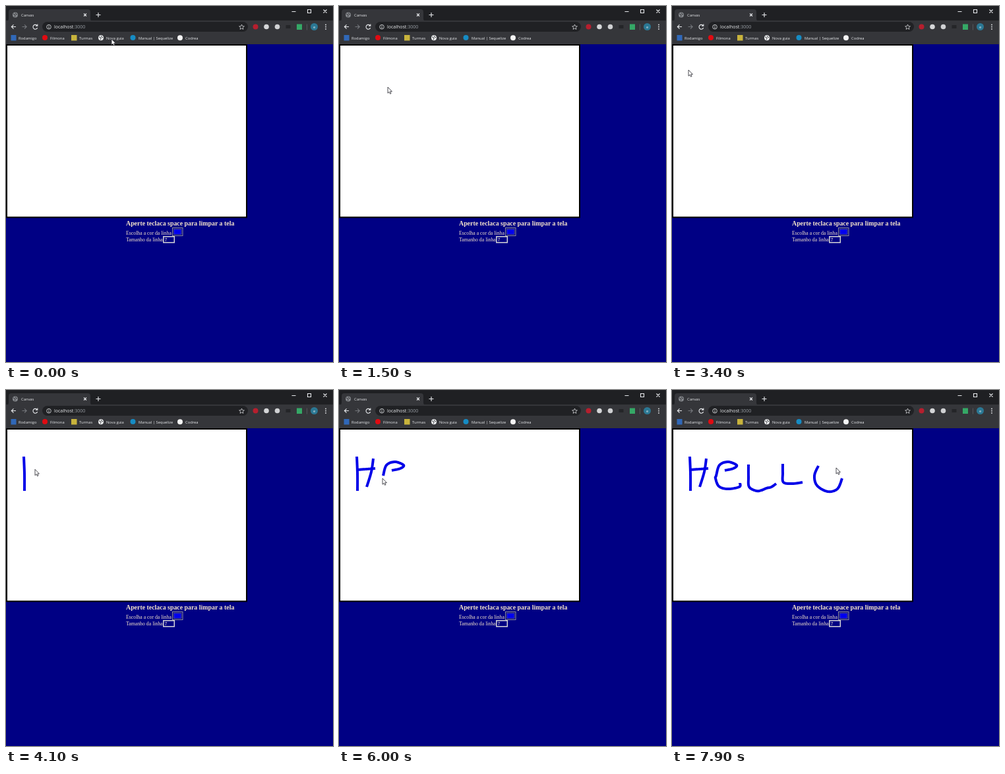
These frames come from a looping animation (496x540 px, 8 s). An HTML page:

```html
<!DOCTYPE html>
<html lang="pt">
<head>
<meta charset="utf-8">
<title>Canvas</title>
<style>
  html, body { margin: 0; width: 100%; height: 100%; overflow: hidden; background: #000084; }
  svg { display: block; }
  .ui { font: 5.8px "Open Sans", "Noto Sans", sans-serif; fill: #e8eaed; }
  .page { font: 7.8px "Liberation Serif", "Times New Roman", serif; fill: #f5e4cb; }
  .line { fill: none; stroke: #e8eaed; stroke-width: 1.1; }
</style>
</head>
<body>
<svg width="496" height="540" viewBox="0 0 496 540">
  <defs>
    <g id="globe">
      <circle r="4"/>
      <path d="M-3 -1.5L-.5 -.5L0 1.5L-1 3M.5 -3L1 -1.2L3 -.5" fill="none" stroke="#35363a"/>
    </g>
  </defs>

  <!-- Browser frame -->
  <rect width="496" height="23" fill="#1f2023"/>
  <path d="M2 23Q4 22 4 19V9Q4 5 8 5H124Q128 5 128 9V19Q128 22 131 23Z" fill="#35363a"/>
  <rect y="22" width="496" height="36" fill="#35363a"/>
  <rect x="55" y="24" width="312" height="15" rx="7.5" fill="#202124"/>
  <use href="#globe" x="14" y="13.5" fill="#85888c"/>
  <g class="line">
    <path d="M118 11.5l4 4m0-4l-4 4M140 10v7m-3.500-3.500h7"/>
    <path d="M433.500 8.500h6M457.500 5.500h5v5h-5zM481.500 5.500l5 5m0-5l-5 5"/>
    <path d="M15 31.500H8.500m3-3.200l-3.200 3.200l3.200 3.200"/>
    <path d="M24.500 31.500H31m-3-3.200l3.200 3.200l-3.200 3.200" stroke="#74777b"/>
    <path d="M47 29.600A3.400 3.400 0 1 0 47.600 33M47.800 27.500v2.800h-2.800"/>
    <path d="M65 31.300v2.500M65 29.500v1" stroke-width=".9"/>
    <circle cx="65" cy="31.700" r="3.300" stroke-width=".8"/>
    <path d="M357.500 28l1.100 2.600l2.800 .2l-2.100 1.900l.6 2.700l-2.400-1.500l-2.400 1.500l.6-2.700l-2.100-1.900l2.800-.2z" stroke-width=".7"/>
    <path d="M456.500 27.500v9" stroke="#606367" stroke-width=".7"/>
  </g>
  <circle cx="378.500" cy="31.500" r="4" fill="#b61f2e"/>
  <circle cx="395" cy="31.500" r="3.800" fill="#d5d6d8"/>
  <circle cx="411.500" cy="31.500" r="3.800" fill="#d0d1d3"/>
  <rect x="424.500" y="29" width="7" height="5" fill="#242528"/>
  <rect x="441" y="27.500" width="8" height="8.500" fill="#35a866"/>
  <circle cx="467.500" cy="31.500" r="5.500" fill="#2b7894"/>
  <text class="ui" x="465.900" y="33.500">e</text>
  <g fill="#e8eaed">
    <circle cx="485" cy="28.500" r=".9"/><circle cx="485" cy="31.700" r=".9"/><circle cx="485" cy="34.900" r=".9"/>
  </g>

  <!-- Bookmarks -->
  <rect x="7.500" y="44" width="8" height="8.500" fill="#3068b8"/>
  <circle cx="59" cy="48" r="4" fill="#e00b12"/>
  <rect x="99" y="44" width="8.500" height="8.500" fill="#c8b33c"/>
  <use href="#globe" x="144" y="48.300" fill="#f1f3f4"/>
  <circle cx="192.500" cy="48" r="4" fill="#168cc4"/>
  <circle cx="264" cy="48.300" r="4" fill="#f5f5f5"/>
  <g class="ui">
    <text x="23" y="15.800">Canvas</text>
    <text x="73" y="34" font-size="7" style="font-size:7px">localhost<tspan fill="#9aa0a6">:3000</tspan></text>
    <text x="19" y="50.500">Rodamigo</text>
    <text x="67" y="50.500">Filmona</text>
    <text x="111" y="50.500">Turmas</text>
    <text x="152" y="50.500">Nova guia</text>
    <text x="201" y="50.500">Manual | Sequelize</text>
    <text x="272" y="50.500">Codrea</text>
  </g>

  <!-- Page -->
  <rect y="58" width="496" height="482" fill="#000084"/>
  <rect x="1" y="59" width="364" height="261.500" fill="#fff" stroke="#000" stroke-width="2"/>
  <g class="page">
    <text x="182" y="333" style="font-size:9.9px;font-weight:bold">Aperte teclaca space para limpar a tela</text>
    <text x="182" y="346.500">Escolha a cor da linha</text>
    <text x="182" y="357">Tamanho da linha</text>
    <rect x="252.500" y="336.500" width="15.500" height="12" fill="#000084" stroke="#8c8c98"/>
    <rect x="254.500" y="338.500" width="11.500" height="8" fill="#0000ee" stroke="#55558c" stroke-width=".8"/>
    <rect x="238.800" y="349.800" width="16.500" height="9" fill="#000084" stroke="#d8d8d8" stroke-width="1.500"/>
    <text x="240.500" y="356.800" style="font:7px 'Liberation Sans',sans-serif">7</text>
  </g>
  <path id="ink" fill="none" stroke="#0000e8" stroke-width="4" stroke-linejoin="round"/>
  <path id="cursor" d="M0 0V9.200L2.100 7.300L3.500 10.300L5 9.600L3.700 6.700H6.400Z" fill="#fff" stroke="#22222a" stroke-width=".8"/>
</svg>
<script>
const LOOP = 8000, FRAME = 100;

// Each move: start time, time per point, pen down, x/y pairs.
const moves = [
  [0, 200, false, 160,50, 205,170, 258,335, 362,250, 210,110, 60,80, 25,95, 45,108],
  [1500, 100, false, 74,123, 160,230, 262,318],
  [1800, 100, false, 262,318, 230,220, 180,110, 300,90, 455,120, 390,180, 318,205],
  [2500, 180, false, 318,205, 250,335, 110,260, 32,150, 26,105, 25,97],
  [3500, 200, true, 27,101, 28,127, 28,153],
  [4200, 200, true, 52,104, 49,124, 42,147],
  [4900, 100, false, 28,125],
  [5000, 200, true, 28,121, 55,119],
  [5400, 100, true, 80,122, 93,119, 98,114, 85,109, 72,114, 67,130, 66,134, 71,146, 84,150, 102,147, 103,141],
  [6450, 50, true, 116,113, 116,132, 117,147, 128,153, 136,152, 143,149, 151,147, 158,142],
  [7100, 75, true, 168,112, 168,126, 169,140, 183,142, 198,140],
  [7550, 50, true, 222,115, 216,130, 220,145, 236,154, 251,150, 258,134],
  [7900, 100, false, 249,118]
].map(([start, step, pen, ...xy]) => {
  const pts = [];
  for (let i = 0; i < xy.length; i += 2) pts.push([xy[i], xy[i + 1]]);
  return { start, step, pen, pts, end: start + step * (pts.length - 1) };
});

const mix = (a, b, u) => a.map((v, i) => v + (b[i] - v) * u);

// Smooth curve through the points of one move.
function along({ start, step, pts }, t) {
  const u = (t - start) / step, i = Math.floor(u), f = u - i;
  const at = k => pts[Math.max(0, Math.min(pts.length - 1, k))];
  const [a, b, c, d] = [at(i - 1), at(i), at(i + 1), at(i + 2)];
  return b.map((v, k) => v + f / 2 * (c[k] - a[k] +
    f * (2 * a[k] - 5 * v + 4 * c[k] - d[k] + f * (3 * (v - c[k]) + d[k] - a[k]))));
}

function pointer(t) {
  const i = moves.findLastIndex(m => m.start <= t), m = moves[i], next = moves[i + 1];
  if (t <= m.end || !next) return along(m, Math.min(t, m.end));
  return mix(m.pts.at(-1), next.pts[0], (t - m.end) / (next.start - m.end));
}

function inkPath(t) {
  let d = "";
  for (const m of moves) {
    if (!m.pen || t <= m.start) continue;
    const end = Math.min(t, m.end), n = Math.ceil((end - m.start) / 10);
    for (let k = 0; k <= n; k++)
      d += (k ? "L" : "M") + along(m, m.start + (end - m.start) * k / n).map(v => v.toFixed(2));
  }
  return d;
}

const ink = document.getElementById("ink"), cursor = document.getElementById("cursor");
const origin = performance.now();

function draw() {
  const elapsed = (performance.now() - origin) % LOOP;
  const t = Math.floor(elapsed / FRAME) * FRAME;
  cursor.setAttribute("transform", `translate(${pointer(t)})`);
  ink.setAttribute("d", inkPath(t - FRAME)); // ink trails the pointer by one step
  requestAnimationFrame(draw);
}
draw();
</script>
</body>
</html>
```
